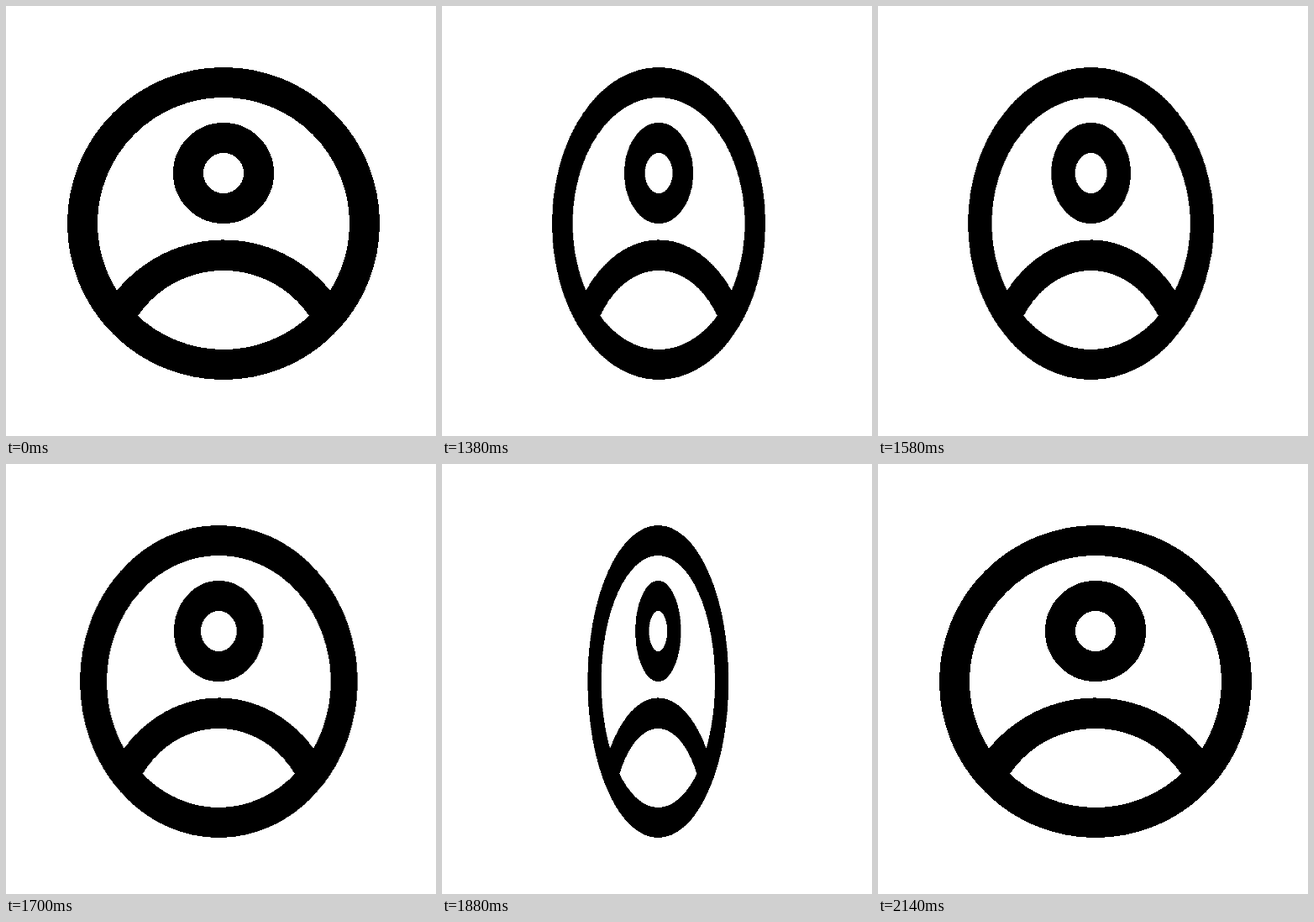
Write an HTML page that moves like this. It is 512 px wide and 512 px high and loops after 2.98 s.

```html
<!DOCTYPE html>
<html lang="en">
<head>
<meta charset="utf-8">
<title>Turning avatar</title>
<style>
  html, body {
    margin: 0;
    width: 100%;
    height: 100%;
    overflow: hidden;
    background: #fff;
  }
  .avatar {
    display: block;
    width: 512px;
    height: 512px;
    shape-rendering: crispEdges;
    transform-origin: 256px 256px;
    animation: turn 2980ms infinite;
  }
  /* One full turn from 1158 ms to 2144 ms, seen without perspective. */
  @keyframes turn {
    0%, 38.859% {
      transform: rotateY(0deg);
      animation-timing-function: cubic-bezier(.3333, 0, .6667, 1);
    }
    71.946%, 100% { transform: rotateY(360deg); }
  }
  .ring { fill: none; stroke: #000; stroke-width: 36; }
</style>
</head>
<body>
<svg class="avatar" viewBox="0 0 512 512">
  <circle class="ring" cx="259" cy="259" r="168"/>
  <circle class="ring" cx="259" cy="199" r="42"/>
  <!-- shoulders, with ends tucked under the outer ring -->
  <path d="M132 339 A163.5 163.5 0 0 1 386 339 L398 352 L373 379 L361 369
           A123.3 123.3 0 0 0 157 369 L145 379 L120 352 Z"/>
</svg>
</body>
</html>
```
